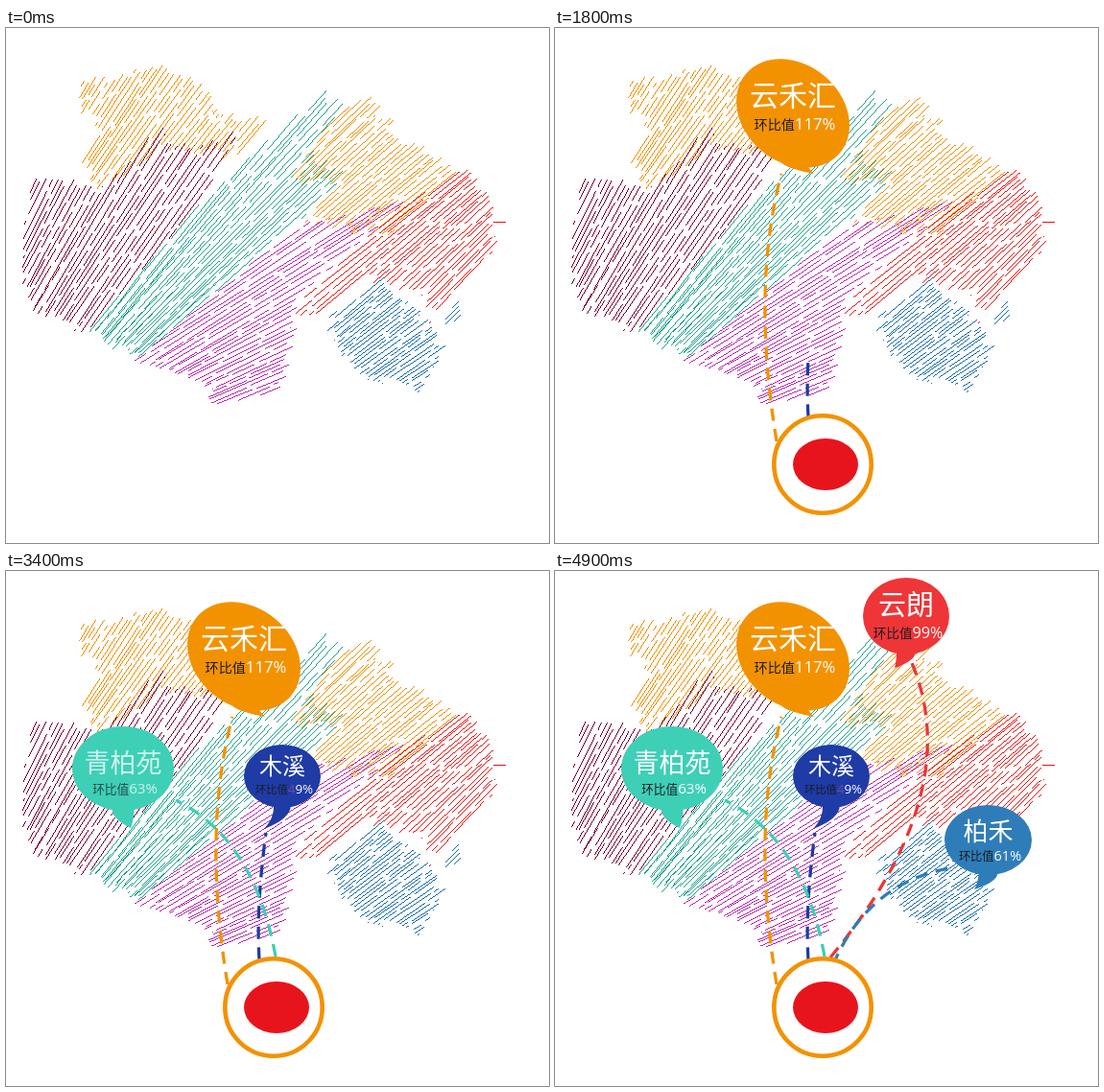
An HTML page with a canvas that plays this animation: 566x537 px, repeating every 8 s.

```html
<!DOCTYPE html>
<html lang="zh-CN">
<head>
<meta charset="utf-8">
<title>Map callouts</title>
<style>
html, body { margin: 0; width: 100%; height: 100%; overflow: hidden; background: #fff; }
canvas { display: block; width: 566px; height: 537px; }
</style>
</head>
<body>
<canvas id="stage" width="566" height="537"></canvas>
<script>
const W = 566, H = 537, LOOP = 8000, STEP = 100;
const ctx = document.getElementById('stage').getContext('2d');
const clamp = v => Math.max(0, Math.min(1, v));
const mix = (a, b, k) => a + (b - a) * k;

let seed = 7;
const rand = (lo = 0, hi = 1) => {
  seed = (seed * 1664525 + 1013904223) >>> 0;
  return mix(lo, hi, seed / 4294967296);
};

const map = document.createElement('canvas');
map.width = W;
map.height = H;
const pen = map.getContext('2d');

// Pixel-crisp strokes with ragged ends, turning from one angle to the other
// between the upper left and the lower right of the region.
function hatch(color, outline, fromAngle, toAngle, gap) {
  const area = new Path2D('M' + outline + 'Z');
  const points = outline.split(' ').map(p => p.split(',').map(Number));
  const mid = [0, 1].map(i => points.reduce((sum, p) => sum + p[i], 0) / points.length);
  const tilt = (fromAngle + toAngle) * Math.PI / 360;
  const nx = Math.sin(tilt), ny = Math.cos(tilt);
  const across = points.map(p => (p[0] - mid[0]) * nx + (p[1] - mid[1]) * ny);
  const first = Math.min(...across) - 20, last = Math.max(...across) + 20;
  pen.fillStyle = color;
  for (let o = first; o < last; o += gap * rand(0.8, 1.2)) {
    const angle = mix(fromAngle, toAngle, (o - first) / (last - first)) + rand(-1, 1);
    const a = angle * Math.PI / 180;
    const unit = Math.max(Math.cos(a), Math.sin(a));
    const dx = Math.cos(a) / unit, dy = -Math.sin(a) / unit;
    let on = true, left = rand(0, 60), shift = 0, ragged = 0;
    for (let d = -260; d < 260; d++) {
      if (--left < 0) {
        on = !on;
        left = on ? rand(12, 65) : rand(2, 5);
        shift = rand(-0.8, 0.8);
        ragged = rand(-5, 5);
      }
      const x = mid[0] + (o + shift) * nx + d * dx;
      const y = mid[1] + (o + shift) * ny + d * dy;
      if (on && pen.isPointInPath(area, x + ragged * dx, y + ragged * dy)) {
        pen.fillRect(Math.round(x), Math.round(y), 1, 1);
      }
    }
  }
}

const AMBER = '#ec8e00', WINE = '#74002f', TEAL = '#1f9f8c',
      PLUM = '#b62bad', RED = '#e81212', BLUE = '#156bac';

hatch(AMBER, '76,58 170,39 218,70 216,88 276,97 246,134 165,122 98,168 78,135 98,105 76,82', 60, 48, 4.3);
hatch(WINE, '24,160 70,162 100,168 160,100 175,125 246,110 190,195 84,316 28,290 16,258', 66, 52, 4.9);
hatch(TEAL, '85,316 190,195 285,105 328,68 348,82 318,130 350,155 308,200 140,342', 53, 39, 4.2);
hatch(AMBER, '296,160 340,90 380,72 408,114 470,148 395,218 312,198 350,160', 45, 37, 4.2);
hatch(PLUM, '137,344 300,208 415,180 300,285 298,320 284,378 220,393 206,366', 38, 20, 4.3);
hatch(RED, '292,298 415,180 475,149 498,172 510,230 480,265 445,303 440,275 375,258 325,298', 36, 48, 4.5);
hatch(BLUE, '338,325 338,300 398,253 398,272 430,300 454,336 434,377 375,362', 42, 31, 4);
hatch(BLUE, '453,312 466,284 476,300', 48, 42, 3.5);
pen.fillStyle = RED;
pen.fillRect(508, 202, 13, 1);

const AMBER_FLAT = '#f39200';

// line: start, middle and end point; body: centre, radii, tilt
// from, pop and ink: when the line, the bubble and its text begin
const callouts = [
  {
    color: AMBER_FLAT, from: 600, pop: 1000, ink: 1300,
    line: [231, 431, 219, 281, 236, 152],
    body: [248, 89, 64, 51, 0.7], tip: [270, 152],
    name: '云禾汇', value: '117%', size: 30, base: 81,
    slide: [5, 0], settle: 1200, ease: 1
  },
  {
    color: '#1f3ba6', from: 1700, pop: 2100, ink: 2400,
    line: [264, 405, 264, 345, 271, 273],
    body: [288, 214, 40, 33, 0], tip: [269, 269],
    name: '木溪', value: '49%', size: 24, base: 212, firstDigit: '#6f4d9c',
    slide: [0, 0], settle: 2200, ease: 1
  },
  {
    color: '#3ecfb7', from: 2700, pop: 3100, ink: 3200,
    line: [281, 402, 244, 300, 177, 239],
    body: [122, 206, 53, 44, 0], tip: [130, 268],
    name: '青柏苑', value: '63%', size: 27, base: 210,
    slide: [-7, 0], settle: 3400, ease: 1
  },
  {
    color: '#ef3537', from: 3500, pop: 4000, ink: 4000,
    line: [287, 403, 382, 230, 363, 77],
    body: [366, 47, 45, 40, 0], tip: [354, 101],
    name: '云朗', value: '99%', size: 29, base: 46,
    slide: [116, 54], settle: 4900, ease: 2.5
  },
  {
    color: '#2f7db8', from: 4300, pop: 4300, ink: 4600,
    line: [268, 494, 315, 367, 411, 310], rides: true,
    body: [451.5, 280.5, 45.5, 36.5, 0], tip: [437, 332],
    name: '柏禾', value: '61%', size: 26, base: 281,
    slide: [114, 40], settle: 4900, ease: 1
  }
];

function drawLine(c, part) {
  const [x0, y0, mx, my, x1, y1] = c.line;
  const cx = 2 * mx - (x0 + x1) / 2, cy = 2 * my - (y0 + y1) / 2;
  ctx.beginPath();
  ctx.moveTo(x0, y0);
  // first part of the curve, split off at its share of the whole
  const ax = mix(x0, cx, part), ay = mix(y0, cy, part);
  ctx.quadraticCurveTo(ax, ay, mix(ax, mix(cx, x1, part), part), mix(ay, mix(cy, y1, part), part));
  ctx.setLineDash([13, 8.5]);
  ctx.lineWidth = 3.3;
  ctx.strokeStyle = c.color;
  ctx.stroke();
  ctx.setLineDash([]);
}

const han = size => size + 'px "Noto Sans CJK SC", "Noto Sans CJK", sans-serif';
const latin = size => size + 'px "Open Sans", "Noto Sans", sans-serif';

// Pieces of [text, font, colour] set side by side around a centre.
function row(pieces, center, y) {
  const widths = pieces.map(([text, font]) => {
    ctx.font = font;
    return ctx.measureText(text).width;
  });
  let x = center - widths.reduce((a, b) => a + b) / 2;
  pieces.forEach(([text, font, color], i) => {
    ctx.font = font;
    ctx.fillStyle = color;
    ctx.fillText(text, x, y);
    x += widths[i];
  });
}

function drawBubble(c, t) {
  const [cx, cy, rx, ry, tilt] = c.body, [tx, ty] = c.tip;
  const root = rx * 0.22, low = cy + ry * 0.93, bend = mix(low, ty, 0.55);
  ctx.globalAlpha = clamp((t - c.pop + STEP) / 300);
  ctx.fillStyle = c.color;
  ctx.beginPath();
  ctx.ellipse(cx, cy, rx, ry, tilt, 0, Math.PI * 2);
  ctx.moveTo(cx + root, low);
  ctx.quadraticCurveTo(cx + root, bend, tx, ty);
  ctx.quadraticCurveTo(cx - root, bend, cx - root, low);
  ctx.fill();
  if (t >= c.ink) {
    const small = c.size * 0.47, digits = latin(small * 1.19);
    ctx.globalAlpha = clamp((t - c.ink + STEP) / 400);
    row([[c.name, han(c.size), '#fff']], cx, c.base);
    row([
      ['环比值', han(small), '#1c1c24'],
      [c.value[0], digits, c.firstDigit || '#fff'],
      [c.value.slice(1), digits, '#fff']
    ], cx + 2, c.base + c.size * 0.82);
  }
  ctx.globalAlpha = 1;
}

function shifted(c, t, paint) {
  const left = clamp((c.settle - t) / (c.settle - c.pop)) ** c.ease;
  ctx.save();
  ctx.translate(c.slide[0] * left, c.slide[1] * left);
  paint();
  ctx.restore();
}

function badge() {
  ctx.beginPath();
  ctx.arc(279, 455, 50.7, 0, Math.PI * 2);
  ctx.fillStyle = '#fff';
  ctx.fill();
  ctx.lineWidth = 4.6;
  ctx.strokeStyle = AMBER_FLAT;
  ctx.stroke();
  ctx.beginPath();
  ctx.ellipse(282, 455, 34, 27, 0, 0, Math.PI * 2);
  ctx.fillStyle = '#e8141c';
  ctx.fill();
}

function draw(t) {
  ctx.fillStyle = '#fff';
  ctx.fillRect(0, 0, W, H);
  ctx.drawImage(map, 0, 0);
  for (const c of callouts) {
    if (t < c.from) continue;
    if (c.rides) shifted(c, t, () => drawLine(c, 1));
    else drawLine(c, clamp((t - c.from + STEP) / 400));
  }
  if (t >= 300) badge();
  for (const c of callouts) {
    if (t >= c.pop) shifted(c, t, () => drawBubble(c, t));
  }
}

const start = performance.now();
let shown = -1;
function tick() {
  const t = Math.floor((performance.now() - start) % LOOP / STEP) * STEP;
  if (t !== shown) draw(shown = t);
  requestAnimationFrame(tick);
}
tick();
</script>
</body>
</html>
```
